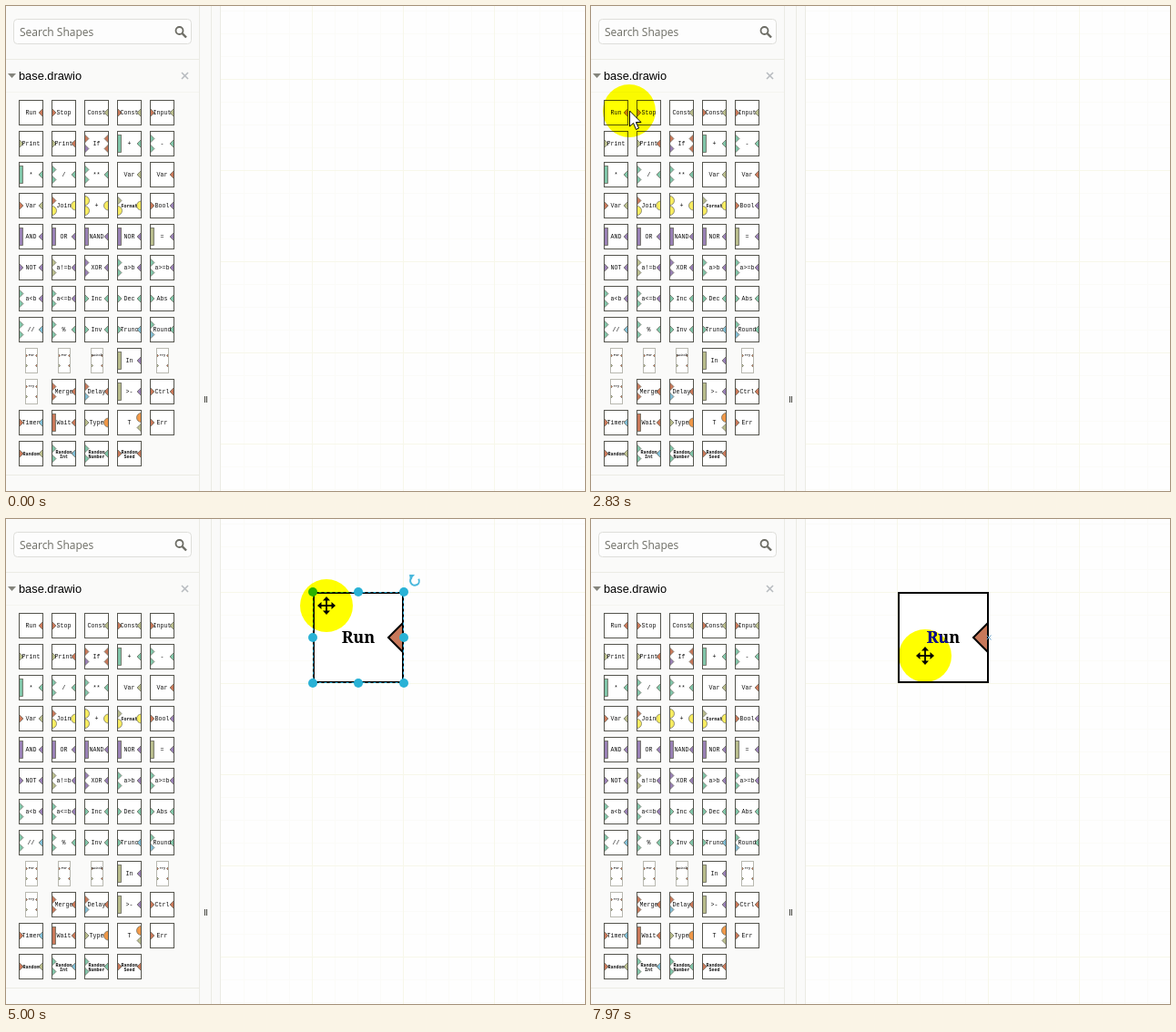
Write an HTML page with a canvas that moves like this. It is 636 px wide and 532 px high and loops after 8 s.

```html
<!DOCTYPE html>
<html lang="en">
<head>
<meta charset="utf-8">
<title>Dragging a shape</title>
<style>
html, body { margin: 0; width: 100%; height: 100%; overflow: hidden; background: #fefefe; }
canvas { display: block; }
</style>
</head>
<body>
<canvas id="stage" width="636" height="532"></canvas>
<script>
const W = 636, H = 532, LOOP = 8000, TAU = Math.PI * 2;
const view = document.getElementById('stage').getContext('2d');
const MONO = '"Liberation Mono", monospace';
const PORTS = { r: '#c8785a', g: '#80c4a8', y: '#b8bc8c', p: '#9880b4', c: '#80bcd4', o: '#f8ec60', q: '#f09848' };
const RULE = '#ebebe4', MUTED = '#6c6c64';

// label | left ports | right ports; upper case is a bar, a leading "~" a narrow cell
const ROWS = [
  'Run||r,Stop|r|,Const||y,Const|r|y,Input|r|y',
  'Print|y|,Print|y|r,If|rp|rr,+|G|g,-|gg|g',
  '*|G|g,/|gg|g,**|gg|g,Var||y,Var||r',
  'Var|r|y,Join|ro|o,+|oo|o,Format|yo|o,Bool|r|p',
  'AND|P|p,OR|P|p,NAND|P|p,NOR|P|p,=|Y|p',
  'NOT|p|p,a!=b|yy|p,XOR|pp|p,a>b|gg|p,a>=b|gg|p',
  'a<b|gg|p,a<=b|gg|p,Inc|g|g,Dec|g|g,Abs|g|g',
  '//|gg|c,%|gg|g,Inv|g|g,Trunc|g|c,Round|gc|g',
  '~For|ry|rr,~For|ry|rr,~Switch|ry|rr,In|Y|p,~Try|ry|rr',
  '~Try|ry|rr,Merge|rr|r,Delay|rc|r,>-|Y|p,Ctrl|r|r',
  'Timer|r|c,Wait|R|r,Type|y|q,T||qy,Err|r|',
  'Random|r|y,Random Int|gg|c,Random Number|gg|g,Random Seed|r|r'
];

// pointer keys: time, x, y
const PATH = [
  [900, 690, 212], [930, 664, 206], [1330, 354, 160], [1730, 293, 142],
  [2170, 293, 142], [2330, 217, 137], [2970, 27, 113],
  [3530, 27, 113], [3870, 50, 113], [4330, 277, 145], [4900, 352, 95],
  [5270, 352, 95], [5930, 330, 272], [7770, 330, 272], [7970, 367, 150], [8000, 367, 150]
];
const PRESS = 3530, DROP = 4960, CLICK = 6630, DESELECT = 6800, RELEASE = 6900;

function pointerAt(t) {
  let i = 0;
  while (i < PATH.length - 2 && t >= PATH[i + 1][0]) i++;
  const a = PATH[i], b = PATH[i + 1], d = b[0] - a[0], u = (t - a[0]) / d;
  const same = (p, q) => p[1] === q[1] && p[2] === q[2];
  const slope = (j, k) => {
    const p = PATH[j - 1], m = PATH[j], n = PATH[j + 1];
    return !p || !n || same(p, m) || same(m, n) ? 0 : (n[k] - p[k]) / (n[0] - p[0]);
  };
  const axis = k => {
    const u2 = u * u, u3 = u2 * u;
    return (2 * u3 - 3 * u2 + 1) * a[k] + (u3 - 2 * u2 + u) * d * slope(i, k)
      + (3 * u2 - 2 * u3) * b[k] + (u3 - u2) * d * slope(i + 1, k);
  };
  return [Math.round(axis(1)), Math.round(axis(2))];
}

function line(c, color, width, ...pts) {
  c.strokeStyle = color;
  c.lineWidth = width;
  c.beginPath();
  for (let i = 0; i < pts.length; i += 2) c.lineTo(pts[i], pts[i + 1]);
  c.stroke();
}

function poly(c, fill, ...pts) {
  c.fillStyle = fill;
  c.beginPath();
  for (let i = 0; i < pts.length; i += 2) c.lineTo(pts[i], pts[i + 1]);
  c.closePath();
  c.fill();
}

function disc(c, x, y, r, fill) {
  c.fillStyle = fill;
  c.beginPath();
  c.arc(x, y, r, 0, TAU);
  c.fill();
}

function text(c, str, x, y, font, color, align = 'left') {
  c.font = font;
  c.fillStyle = color;
  c.textAlign = align;
  c.fillText(str, x, y);
}

function drawPort(c, kind, edge, y, dir, h) {
  c.strokeStyle = '#66665a';
  c.lineWidth = 0.7;
  if (kind === 'o' || kind === 'q') {
    c.save();
    c.beginPath();
    c.rect(dir > 0 ? edge : edge - 6, y - 6, 6, 12);
    c.clip();
    disc(c, edge, y, 5, PORTS[kind]);
    c.stroke();
    c.restore();
  } else {
    poly(c, PORTS[kind], edge, y - h, edge + dir * h, y, edge, y + h);
    c.stroke();
  }
}

function drawCell(c, spec, x, y) {
  const [label, left, right] = spec.split('|');
  const narrow = label[0] === '~';
  const w = narrow ? 13 : 26, h = 27, top = y + 0.5;
  const x0 = x + (narrow ? 7.5 : 0.5), mid = x0 + w / 2;
  c.fillStyle = '#fff';
  c.fillRect(x0, top, w, h);
  const spots = n => n.length > 1 ? [8, 19] : [13.5];
  if (/[A-Z]/.test(left)) {
    c.fillStyle = PORTS[left.toLowerCase()];
    c.fillRect(x0, top + 4, 4, 19);
    c.strokeStyle = '#66665a';
    c.lineWidth = 0.8;
    c.strokeRect(x0, top + 4, 4, 19);
  } else {
    [...left].forEach((k, i) => drawPort(c, k, x0, top + spots(left)[i], 1, narrow ? 2 : 4.5));
  }
  [...right].forEach((k, i) => drawPort(c, k, x0 + w, top + spots(right)[i], -1, narrow ? 2 : 4.5));
  c.strokeStyle = narrow ? '#b8b8b0' : '#55554e';
  c.lineWidth = 1;
  c.strokeRect(x0, top, w, h);
  if (narrow) {
    text(c, label.slice(1), mid, top + 8, `bold 3.5px ${MONO}`, '#333', 'center');
  } else {
    const words = label.split(' '), font = label.length > 5 ? 'bold 5px ' : '6.6px ';
    words.forEach((s, i) =>
      text(c, s, mid, top + 15.5 + (i * 2 - words.length + 1) * 2.5, font + MONO, '#111', 'center'));
  }
}

function drawBase(c) {
  c.fillStyle = '#fefefe';
  c.fillRect(0, 0, W, H);
  for (const [step, color] of [[25, '#fbfbf8'], [100, '#f7f7ea']]) {
    for (let x = 236.5 + step; x < W; x += step) line(c, color, 1, x, 0, x, H);
    for (let y = 80.5 % step; y < H; y += step) line(c, color, 1, 236, y, W, y);
  }
  c.fillStyle = '#fafaf9';
  c.fillRect(0, 0, 235, H);
  for (const x of [212.5, 225.5, 235.5]) line(c, RULE, 1, x, 0, x, H);
  for (const y of [58.5, 514.5]) line(c, RULE, 1, 0, y, 212, y);
  line(c, '#f4f4f0', 1, 0, 94.5, 212, 94.5);
  for (const x of [218.5, 220.5]) line(c, '#44443e', 1, x, 428, x, 435);

  c.beginPath();
  c.roundRect(8.5, 14.5, 195, 27, 4);
  c.fillStyle = '#fdfdfd';
  c.fill();
  c.strokeStyle = '#dededa';
  c.lineWidth = 1;
  c.stroke();
  text(c, 'Search Shapes', 15, 33, '12px "Open Sans", sans-serif', MUTED);
  c.strokeStyle = MUTED;
  c.lineWidth = 1.8;
  c.beginPath();
  c.arc(190.5, 27, 4, 0, TAU);
  c.stroke();
  line(c, MUTED, 2.4, 193.5, 30, 198, 34.5);

  poly(c, '#84847c', 2, 74, 11, 74, 6.5, 79);
  text(c, 'base.drawio', 14, 81, '12.8px "Liberation Sans", sans-serif', '#000');
  line(c, '#b8bcc0', 1.6, 193, 73, 200, 80);
  line(c, '#b8bcc0', 1.6, 200, 73, 193, 80);

  ROWS.forEach((row, r) => row.split(',').forEach((s, i) => drawCell(c, s, 14 + 36 * i, 103 + 34 * r)));
}

const base = document.createElement('canvas');
base.width = W;
base.height = H;
drawBase(base.getContext('2d'));

function runLabel(c, color) {
  text(c, 'Run', 387, 135.5, 'bold 18px "Noto Serif", serif', color, 'center');
}

function drawShape(c) {
  c.fillStyle = '#fff';
  c.fillRect(338, 81, 98, 98);
  c.strokeStyle = '#000';
  c.lineWidth = 2;
  c.strokeRect(338, 81, 98, 98);
  poly(c, PORTS.r, 436, 114, 420, 130, 436, 146);
  c.stroke();
  runLabel(c, '#000');
}

function drawSelection(c) {
  c.setLineDash([3, 3]);
  c.strokeStyle = '#29a8d4';
  c.lineWidth = 1;
  c.strokeRect(337.5, 80.5, 99, 99);
  c.setLineDash([]);
  for (const x of [337, 387, 437])
    for (const y of [80, 130, 180])
      if (x !== 387 || y !== 130) disc(c, x, y, 5, '#29b2d6');
  c.strokeStyle = '#4ab8dc';
  c.lineWidth = 2;
  c.beginPath();
  c.arc(449, 68, 4.8, -0.5, 4);
  c.stroke();
  poly(c, '#4ab8dc', 443, 61, 449, 61, 444, 67);
}

function drawTip(c, alpha) {
  c.save();
  c.globalAlpha = alpha;
  c.fillStyle = '#fff';
  c.fillRect(223.5, 59.5, 159, 118);
  c.strokeStyle = '#d8d8d4';
  c.lineWidth = 1;
  c.strokeRect(223.5, 59.5, 159, 118);
  c.strokeStyle = '#222';
  c.strokeRect(283.5, 80.5, 40, 40);
  poly(c, PORTS.r, 323, 94, 317, 100.5, 323, 107);
  c.stroke();
  text(c, 'Run', 303, 104, `bold 8px ${MONO}`, '#000', 'center');
  text(c, 'Run', 303, 154, '13px "Liberation Sans", sans-serif', '#444', 'center');
  c.restore();
}

function drawPreview(c, x, y) {
  let px = x - 8, py = y + 1, size = 41;
  if (x > 236) {
    const snap = (v, o) => o + 25 * Math.round((v - o) / 25);
    px = snap(x - 15, 237);
    py = snap(y - 15, 80);
    size = 101;
  }
  c.setLineDash([2, 3]);
  c.strokeStyle = '#000';
  c.lineWidth = 1;
  c.strokeRect(px + 0.5, py + 0.5, size, size);
  c.setLineDash([]);
}

function arrowCursor(c) {
  poly(c, '#fff', 0.5, 0, 0.5, 17, 4.5, 13.5, 7.5, 20.5, 10.5, 19, 7.5, 12.5, 13, 12.5);
  c.strokeStyle = '#000';
  c.lineWidth = 1;
  c.stroke();
}

function resizeCursor(c) {
  for (const s of [-1, 1]) {
    line(c, '#000', 1.5, s * 1.7, -8, s * 1.7, 8);
    line(c, '#000', 1.5, s * 3, 0, s * 10, 0);
    line(c, '#000', 1.5, s * 6.5, -3.5, s * 10, 0, s * 6.5, 3.5);
  }
}

function moveCursor(c) {
  for (let i = 0; i < 4; i++) {
    line(c, '#000', 1.8, 0, 0, 0, -7);
    poly(c, '#000', 0, -10, 4, -5.5, -4, -5.5);
    c.rotate(Math.PI / 2);
  }
}

function drawPointer(c, x, y, state) {
  c.globalCompositeOperation = 'multiply';
  disc(c, x, y, 29, '#ffff00');
  c.globalCompositeOperation = 'source-over';
  if (state.shape) {
    c.save();
    c.beginPath();
    c.arc(x, y, 29, 0, TAU);
    c.clip();
    runLabel(c, '#101090');
    c.restore();
  }
  if (state.pressed) {
    c.strokeStyle = '#f00';
    c.lineWidth = 3;
    c.beginPath();
    c.arc(x + 0.5, y + 0.5, 6, 0, TAU);
    c.stroke();
  }
  c.save();
  c.translate(x, y);
  const overShape = state.shape && x > 337 && x < 437 && y > 80 && y < 180;
  if (overShape) moveCursor(c);
  else if (!state.pressed && x > 211 && x < 226) resizeCursor(c);
  else arrowCursor(c);
  c.restore();
}

function draw(t) {
  const c = view, [x, y] = pointerAt(t);
  const dragging = t >= PRESS && t < DROP;
  const state = {
    shape: t >= DROP,
    pressed: dragging || (t >= CLICK && t < RELEASE)
  };
  c.drawImage(base, 0, 0);
  if (t > 2850 && t < 4000) {
    c.fillStyle = 'rgba(224,224,216,.6)';
    c.fillRect(10, 100, 35, 33);
  }
  if (t >= 3070 && t < PRESS + 70) drawTip(c, Math.min(1, (t - 3030) / 140));
  if (state.shape) drawShape(c);
  if (state.shape && t < DESELECT) drawSelection(c);
  if (dragging && t > PRESS + 100) drawPreview(c, x, y);
  if (t >= 7840) {
    line(c, '#70a8d0', 1, 434.5, 127.5, 439.5, 132.5);
    line(c, '#70a8d0', 1, 439.5, 127.5, 434.5, 132.5);
  }
  if (t >= 930) drawPointer(c, x, y, state);
}

const start = performance.now();
function frame() {
  draw((performance.now() - start) % LOOP);
  requestAnimationFrame(frame);
}
frame();
</script>
</body>
</html>
```
